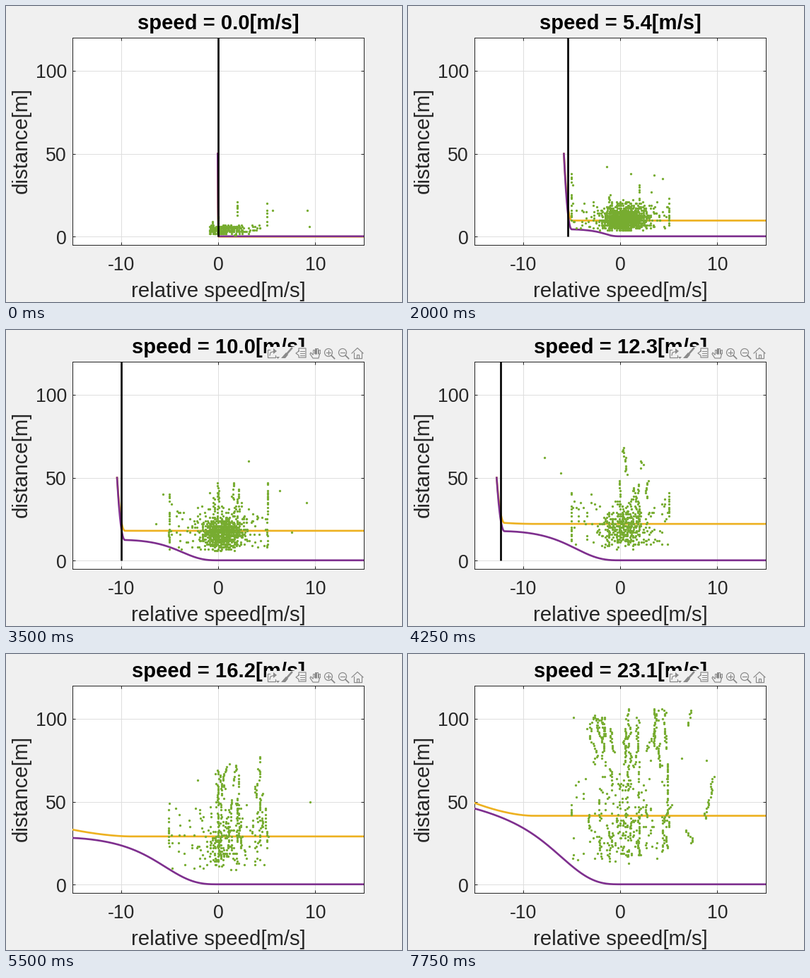
Write a matplotlib script that moves like this. It is 560 px wide and 420 px high and loops after 8 s.

```python
import numpy as np
import matplotlib.pyplot as plt
from matplotlib.animation import FuncAnimation
from matplotlib.patches import Circle, Polygon, Rectangle

plt.rcParams["font.family"] = "Liberation Sans"
W, H = 560, 420
LEFT, RIGHT, TOP, BOTTOM = 94, 506, 45, 339
ORANGE, PURPLE, GREEN = "#EDB120", "#7E2F8E", "#77AC30"
BACK, DARK, ICON = "#F0F0F0", "#262626", "#8A8A8A"
STEP = 10 / 13                      # speed gained per frame, m/s
TOOLBAR_STEP = 9


def column(rng, x, y0, y1, keep, wander=0.0):
    """Dots one metre apart whose relative speed drifts at random."""
    y = np.arange(y0, y1)
    x = x + np.cumsum(rng.normal(0, wander, len(y)))
    return np.c_[x, y][rng.random(len(y)) < keep]


def cloud(step, speed):
    """Measured cars: a dense core, a loose fan, lanes and drifting tracks."""
    rng = np.random.default_rng(step)
    near, far = 2 + .5 * speed, 30 + 3.3 * speed
    middle, height = 4 + 1.25 * speed, 1.5 + .45 * speed
    count = int(130 + 1200 * np.exp(-((speed - 6.5) / 4.3) ** 2))

    core = rng.normal((.4, middle), (1.15, height), (count, 2))
    fan = rng.uniform((-5, near), (5, 2 * middle), (70, 2))
    strays = rng.uniform((-10, middle), (10, far), (8, 2))
    parts = [core, fan, strays]
    for lane in (-5, 0, 2, 5):
        start = rng.uniform(near, middle + 10)
        parts.append(column(rng, lane, start, rng.uniform(start, far), .5, .015))
    width = 1.3 + 2 * (speed / 22) ** 6
    for _ in range(int(speed ** 2 / 18)):
        start = rng.uniform(near, far - 10)
        stop = min(far, start + rng.uniform(5, 8 + speed))
        x = np.clip(rng.normal(.5 + .05 * speed, width), -5, 10)
        parts.append(column(rng, x, start, stop, .8, .09))

    x, y = np.vstack(parts).T
    valid = (x > -speed - .9) & (x <= 10) & (y >= near - 1) & (y <= far)
    return np.round(x[valid], 1), np.round(y[valid])


def lower_distance(x, speed):
    closing = np.clip(-x, 0, speed)
    v = max(speed, .3)
    knee = 5.6 * (1 - np.exp(-(v / 10) ** 2))
    gap = .457 * v ** -.27 * closing * (v - closing / 2)
    return .2 + gap * (1 - np.exp(-(closing / knee) ** 2))


def upper_distance(x, speed):
    bend = max(0, .53 * (speed - 8.4))
    return 1.8 * speed + bend * ((-x - 9) / 6).clip(0, 1) ** 1.7


def with_rise(curve, speed):
    """The curve, climbing to 50 m around the point -speed."""
    half = .05 + .36 * min(1, speed / 5)
    rise_x = np.linspace(-speed - half, -speed + half, 25)
    body = np.linspace(-speed + half, 15, 800)
    y = curve(body, speed)
    rise = y[0] + (50 - y[0]) * np.linspace(1, 0, 25) ** 2.2
    return np.r_[rise_x, body], np.r_[rise, y]


fig = plt.figure(figsize=(W / 72, H / 72), dpi=72, facecolor=BACK)
ax = fig.add_axes([LEFT / W, 1 - BOTTOM / H, (RIGHT - LEFT) / W, (BOTTOM - TOP) / H])
ax.set(xlim=(-15, 15), ylim=(-5, 120), xticks=[-10, 0, 10], yticks=[0, 50, 100])
ax.set_axisbelow(True)
ax.grid(color="#DEDEDE", lw=1)
ax.tick_params(direction="in", top=True, right=True, length=4, width=1, color=DARK,
               labelbottom=False, labelleft=False)
for spine in ax.spines.values():
    spine.set(color=DARK, lw=1)
upper, = ax.plot([], [], color=ORANGE, lw=2.67, zorder=3)
lower, = ax.plot([], [], color=PURPLE, lw=2.67, zorder=4)
points, = ax.plot([], [], "o", color=GREEN, ms=3.3, mew=0, zorder=5)
own, = ax.plot([0, 0], [0, 120], color="black", lw=2.67, zorder=6, solid_capstyle="butt")

# Pixel-space layer for the text and the toolbar
page = fig.add_axes([0, 0, 1, 1], zorder=5)
page.set(xlim=(0, W), ylim=(H, 0))
page.axis("off")


def label(x, y, text, size=26.67, color=DARK, ha="center", **kw):
    return page.text(x, y, text, size=size, color=color, ha=ha, va="baseline", zorder=1, **kw)


for value in (-10, 0, 10):
    label(300.7 + value * 13.73, 375, str(value))
for value in (0, 50, 100):
    label(86, 337.7 - value * 2.352, str(value), ha="right")
label(300.5, 413, "relative speed[m/s]", 29.33)
label(30, 191, "distance[m]", 29.33, rotation=90, rotation_mode="anchor")
title = label(300.3, 33, "", 29.2, "black", weight="bold")

toolbar = []


def add(patch):
    toolbar.append(page.add_patch(patch))


def stroke(*xy, lw=1.2):
    toolbar.append(page.plot(xy[::2], xy[1::2], color=ICON, lw=lw, zorder=3)[0])


def fill(*xy):
    add(Polygon(np.reshape(xy, (-1, 2)), color=ICON, lw=0, zorder=3))


def build_toolbar():
    add(Rectangle((367.5, 24), 140, 18, color=BACK, lw=0, zorder=2))
    # export
    stroke(373, 28, 370, 28, 370, 39, 381, 39, 381, 36)
    stroke(373, 36, 374, 32, 380, 30)
    fill(378, 26, 383, 30, 378, 34)
    fill(382, 38, 387, 38, 384.5, 41)
    # brush
    stroke(404, 26, 397, 34, lw=2.6)
    fill(396, 32, 399, 35, 395, 40, 389, 40)
    # data tip
    stroke(414, 30, 414, 26, 424, 26, 424, 39, 414, 39, 414, 36, 410, 33, 414, 30)
    for y in (30, 33, 36):
        stroke(416, y, 422, y, lw=1)
    # hand
    stroke(434, 35, 431, 32, 430, 34, 434, 40, 442, 40, 443.5, 34)
    for i in range(4):
        x, top = 434 + 2.6 * i, 26 + (i - 1.5) ** 2
        stroke(x, 34, x, top, x + 1.8, top, x + 1.8, 33, lw=1)
    # zoom in and out
    for x in (456, 476):
        add(Circle((x, 32), 5.5, fill=False, ec=ICON, lw=1.2, zorder=3))
        stroke(x + 4, 36, x + 8.5, 40.5, lw=1.8)
        stroke(x - 3, 32, x + 3, 32)
    stroke(456, 29, 456, 35)
    # home
    stroke(489, 33, 497, 25.5, 505, 33)
    stroke(491.5, 32, 491.5, 40, 502.5, 40, 502.5, 32)
    stroke(495.5, 40, 495.5, 35, 498.5, 35, 498.5, 40)


build_toolbar()


def draw(frame):
    step = max(0, frame - 1)
    speed = step * STEP
    title.set_text(f"speed = {speed:.1f}[m/s]")
    own.set_xdata([-speed, -speed])
    lower.set_data(*with_rise(lower_distance, speed))
    upper.set_data(*with_rise(upper_distance, speed))
    points.set_data(*cloud(step, speed))
    for part in toolbar:
        part.set_visible(step >= TOOLBAR_STEP)
    return upper, lower, points, own, title


anim = FuncAnimation(fig, draw, frames=32, init_func=lambda: draw(0),
                     interval=250, repeat=True, repeat_delay=0, blit=False)
plt.show()
```
